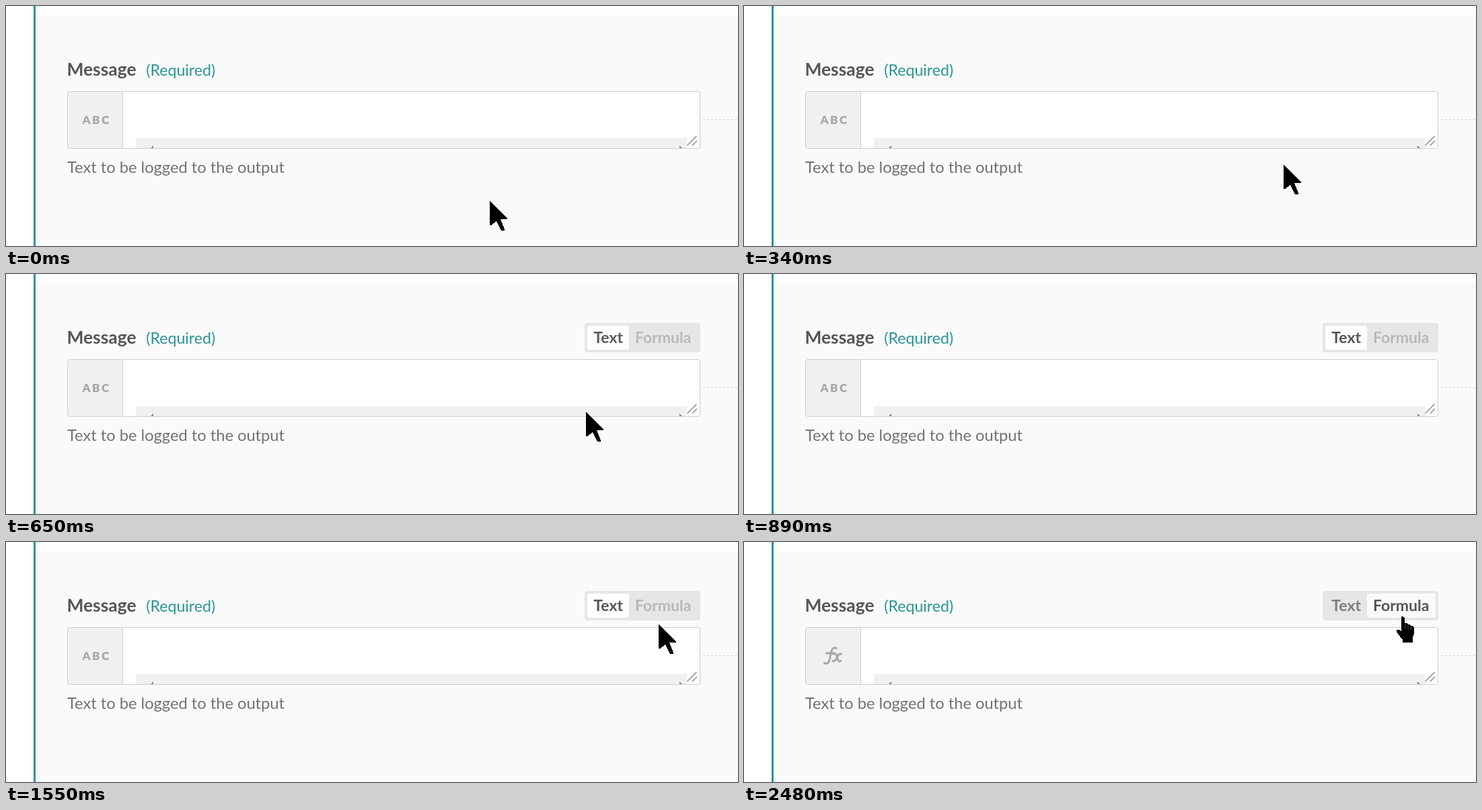
Animation, 1088 px wide and 358 px high, one loop 3220 ms. Source, as an HTML page:

```html
<!DOCTYPE html>
<html lang="en">
<head>
<meta charset="utf-8">
<title>Message field</title>
<style>
  html, body { margin: 0; width: 100%; height: 100%; overflow: hidden; background: #fff; }
  svg { display: block; width: 1088px; height: 358px; font-family: Lato, sans-serif; }
  .bold { font-weight: 700; }
</style>
</head>
<body>
<svg viewBox="0 0 1088 358">
  <rect x="44" y="13" width="1044" height="345" fill="#fafafa"/>
  <rect x="41" width="3" height="358" fill="#2f9299"/>
  <path d="M1036 169.5H1088" stroke="#cfcfcf" stroke-dasharray="3 3"/>

  <text class="bold" x="90.5" y="104" font-size="26.4" fill="#555">Message</text>
  <text x="208.2" y="104" font-size="23.2" fill="#2c9494">(Required)</text>
  <text x="91" y="249" font-size="23.7" fill="#727272">Text to be logged to the output</text>

  <rect x="91.5" y="127.5" width="940" height="85" rx="3.5" fill="#fff"/>
  <path d="M173.5 128H95a3 3 0 0 0-3 3V209a3 3 0 0 0 3 3H173.5Z" fill="#f0f0f0"/>
  <rect x="193" y="197" width="819" height="15" fill="#f0f0f0"/>
  <path d="M215 212l4-4v4zM1001 208l4 4h-4z" fill="#858585"/>
  <path d="M1012.5 208l14-14M1020 208l7-7" stroke="#8c8c8c" stroke-width="1.5"/>
  <path d="M173.5 128V212" stroke="#ccc"/>
  <rect x="91.5" y="127.5" width="940" height="85" rx="3.5" fill="none" stroke="#ccc"/>

  <text id="abc" x="113.5" y="175.5" font-size="17" font-weight="900" letter-spacing="2.5" fill="#a6a6a6">ABC</text>
  <g id="fx" fill="none" stroke="#a6a6a6" stroke-width="2.9" stroke-linecap="round">
    <path d="M137.5 158.6C133.5 156.6 131 158.5 130 163L127 176C126 180.5 123.5 182.2 119.5 180.7M122.5 166H134"/>
    <path d="M133 167.2C136 165.5 137.3 167 138 170L139.5 175.5C140.3 178.5 142 178.8 144 177.2M144.5 167C142 165.8 140.5 168 138.8 171.3C137 175 135 179 131.8 177.5"/>
  </g>

  <g id="toggle">
    <rect x="860" y="73" width="172" height="44" rx="4" fill="#e6e6e6"/>
    <rect id="pillText" x="864" y="77" width="62" height="36" rx="3" fill="#fff"/>
    <rect id="pillFormula" x="926" y="77" width="102" height="36" rx="3" fill="#fafafa"/>
    <text id="text" class="bold" x="873.3" y="103" font-size="23">Text</text>
    <text id="formula" class="bold" x="935" y="103" font-size="23">Formula</text>
  </g>

  <path id="arrow" d="M0 0L26 25V27H16L22 42V44H17L10 30L2 36H0Z" shape-rendering="crispEdges"/>
  <g id="hand" transform="translate(969 111)">
    <path d="M8 0H11L13 3V10H17L18 12H21L22 14H25L27 17V26L25 31V39H10V35L6 30L1 23V20H5L8 23Z" shape-rendering="crispEdges"/>
    <path d="M13.5 11V18M18 13V19M22.5 15V20" stroke="#555" stroke-width=".8"/>
  </g>
</svg>
<script>
const LOOP = 3220, ENTER = 1300, HOVER = 1920, SWITCH = 2450;
const $ = id => document.getElementById(id);

const ramp = (t, from, to) => Math.min(1, Math.max(0, (t - from) / (to - from)));
const mix = (a, b, k) => a + (b - a) * k;
const easeOut = k => 1 - (1 - k) ** 1.1;
const gray = v => `rgb(${v},${v},${v})`;
const set = (id, name, value) => $(id).setAttribute(name, value);
const show = (id, on) => set(id, "visibility", on ? "visible" : "hidden");

// Pointer strokes; the pointer rests between them
const approach = [
  { from: 70, to: 510, x: 846, y: 208 },
  { from: 600, to: 650, x: 862, y: 206 },
  { from: 750, to: 890, x: 880, y: 196 }
];
const climb = [
  { from: 1330, to: 1550, x: 970, y: 123 },
  { from: 1590, to: 1820, x: 969, y: 108 }
];

function follow(strokes, t, x, y) {
  for (const s of strokes) {
    const k = easeOut(ramp(t, s.from, s.to));
    x = mix(x, s.x, k);
    y = mix(y, s.y, k);
  }
  return `translate(${Math.round(x)} ${Math.round(y)})`;
}

function draw(t) {
  const entered = t >= ENTER, switched = t >= SWITCH;
  set("arrow", "transform", entered ? follow(climb, t, 951, 150) : follow(approach, t, 719, 291));
  show("arrow", t < 890 || (entered && t < HOVER));
  show("hand", t >= HOVER);
  show("abc", !switched);
  show("fx", switched);

  const k = switched ? mix(.5, 1, ramp(t, SWITCH, SWITCH + 30)) : 0;
  set("toggle", "opacity", ramp(t, 390, 660));
  set("pillText", "opacity", 1 - k);
  set("pillFormula", "opacity", k);
  set("text", "fill", gray(mix(85, 125, k)));
  set("formula", "fill", gray(mix(mix(184, 128, ramp(t, 1620, 1820)), 85, k)));
}

const start = performance.now();
function tick() {
  draw((performance.now() - start) % LOOP);
  requestAnimationFrame(tick);
}
tick();
</script>
</body>
</html>
```
